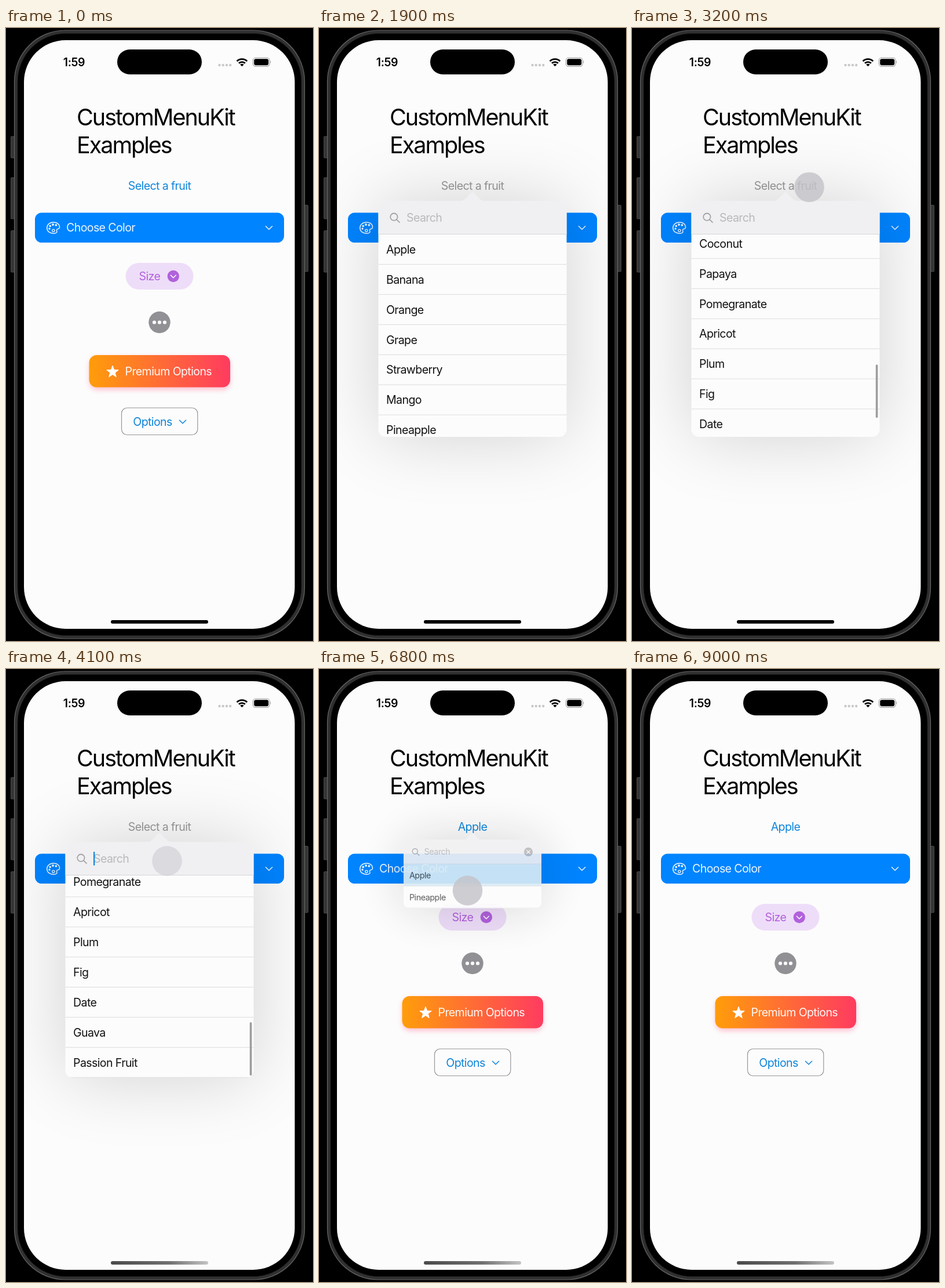
An HTML page that plays this animation: 530 px wide and 1057 px high, repeating every 9.1 s.

```html
<!DOCTYPE html>
<html lang="en">
<head>
<meta charset="utf-8">
<title>Menu examples</title>
<style>
  html, body { margin: 0; width: 100%; height: 100%; overflow: hidden; background: #000; }
  svg { display: block; }
  text {
    font: 400 19.6px Inter, "Liberation Sans", sans-serif;
    font-optical-sizing: none;
    letter-spacing: -.032em;
    white-space: pre;
  }
  .title { font-size: 39.5px; letter-spacing: -.051em; }
  .clock { font-size: 19.5px; font-weight: 600; letter-spacing: -.02em; }
  .mid { text-anchor: middle; }
  .line { fill: none; stroke-linecap: round; stroke-linejoin: round; }
</style>
</head>
<body>
<svg width="530" height="1057" viewBox="0 0 530 1057">
  <defs>
    <linearGradient id="sunset">
      <stop offset="0" stop-color="#ff9d0a"/>
      <stop offset="1" stop-color="#ff3b60"/>
    </linearGradient>
    <linearGradient id="faded">
      <stop offset="0" stop-color="#4a4a4a"/>
      <stop offset=".6" stop-color="#707070"/>
      <stop offset="1" stop-color="#c4c4c4"/>
    </linearGradient>
    <filter id="soft" x="-100%" y="-100%" width="300%" height="300%"><feGaussianBlur stdDeviation="62"/></filter>
    <filter id="glow" x="-20%" y="-50%" width="140%" height="200%"><feGaussianBlur stdDeviation="5"/></filter>
    <clipPath id="screen"><rect x="31" y="21" width="467.5" height="1015" rx="72"/></clipPath>
    <clipPath id="panelClip"><rect class="box" x="102.5" y="298" width="325" height="407" rx="13"/></clipPath>
    <clipPath id="listClip"><rect x="102" y="355.5" width="326" height="350"/></clipPath>
    <path id="chevron" class="line" d="M-5.6-2.8 0 2.8 5.6-2.8"/>
  </defs>

  <g fill="#343434" stroke="#575757" stroke-width=".8">
    <rect x="8.5" y="187" width="8" height="37" rx="1"/>
    <rect x="8.5" y="258" width="8" height="71" rx="1"/>
    <rect x="8.5" y="349.500" width="8" height="71.500" rx="1"/>
    <rect x="513.500" y="305.500" width="8" height="114.500" rx="1"/>
  </g>
  <rect x="14.500" y="4" width="501" height="1049" rx="88" fill="#303030" stroke="#666" stroke-width="1.2"/>
  <rect x="20" y="9.500" width="490" height="1038" rx="83" stroke="#1b1b1b"/>
  <rect x="31" y="21" width="467.5" height="1015" rx="72" fill="#fcfcfc"/>

  <g clip-path="url(#screen)">
    <rect x="192" y="37" width="146" height="43" rx="21.500"/>
    <text class="clock mid" x="117.500" y="66">1:59</text>
    <g fill="#c9c9c9">
      <circle cx="368.500" cy="64" r="2.200"/><circle cx="374.700" cy="64" r="2.200"/>
      <circle cx="381" cy="64" r="2.200"/><circle cx="387.200" cy="64" r="2.200"/>
    </g>
    <g fill="none" stroke="#000" stroke-width="2.900">
      <path d="M398.600 57.200a12.600 12.600 0 0 1 17.600 0"/>
      <path d="M402 60.800a7.800 7.800 0 0 1 10.800 0"/>
    </g>
    <path d="M407.400 66.300l-3.200-3.300a4.600 4.600 0 0 1 6.400 0z"/>
    <rect x="426.300" y="51.300" width="28.800" height="14.800" rx="4.600" fill="none" stroke="#9b9b9b" stroke-width="1.100"/>
    <rect x="428.200" y="53.200" width="25" height="11" rx="3"/>
    <path d="M456.300 56.300q2 2.400 0 4.800z" fill="#9b9b9b"/>

    <text class="title" x="122" y="168">CustomMenuKit</text>
    <text class="title" x="122" y="216">Examples</text>
    <text id="fruit" class="mid" x="265" y="279"></text>

    <rect x="50" y="318.500" width="430" height="51.500" rx="11.500" fill="#0084ff"/>
    <g stroke="#fff" opacity=".93">
      <path class="line" stroke-width="1.500" d="M82 335C75 335 70.500 339.500 70.700 345C71 351 76 354.300 82.500 354.200C86.500 354.100 88.600 352.500 87.700 350.200C86.800 347.600 88.400 346.500 90.300 346.300C92.300 346 92.700 344 92.400 342.300C91.400 337.600 87.500 335 82 335Z"/>
      <circle cx="81.800" cy="349.300" r="2.100" fill="none" stroke-width="1.300"/>
      <g fill="#fff" stroke="none">
        <circle cx="75" cy="346" r="1.700"/><circle cx="76.200" cy="341.400" r="1.800"/>
        <circle cx="81" cy="339" r="1.900"/><circle cx="86.300" cy="339.800" r="1.900"/>
      </g>
      <use href="#chevron" x="454" y="344.500" stroke-width="1.500"/>
    </g>
    <text x="104" y="351" fill="#fff" fill-opacity=".93">Choose Color</text>

    <rect x="206.500" y="405" width="117" height="46" rx="23" fill="#eeddf9"/>
    <text id="size" x="229.500" y="435">Size</text>
    <circle id="sizeDot" cx="288.800" cy="428" r="10.200"/>
    <use href="#chevron" x="0" y="0" transform="translate(288.800 428.500) scale(.8)" stroke="#fff" stroke-width="1.900"/>

    <circle cx="265" cy="507.500" r="18.700" fill="#919195"/>
    <g fill="#fff">
      <circle cx="256" cy="507.500" r="3.100"/><circle cx="265" cy="507.500" r="3.100"/><circle cx="274" cy="507.500" r="3.100"/>
    </g>

    <rect x="144" y="568" width="243" height="56" rx="14" fill="#ff4a78" opacity=".32" filter="url(#glow)"/>
    <rect x="143.500" y="564" width="243.500" height="55.500" rx="13" fill="url(#sunset)"/>
    <path id="star" fill="#fff" stroke="#fff" stroke-width="1" stroke-linejoin="round"/>
    <text x="205.500" y="599" fill="#fff" fill-opacity=".95">Premium Options</text>

    <rect x="199.500" y="655" width="131.300" height="46.500" rx="9.500" fill="none" stroke="#96969a" stroke-width="1.200"/>
    <text id="options" class="mid" x="253" y="685.500">Options</text>
    <use id="optionsArrow" href="#chevron" x="305" y="679" stroke-width="1.500"/>

    <g id="menu">
      <rect class="box" x="102.500" y="298" width="325" height="407" rx="13" opacity=".17" filter="url(#soft)"/>
      <g id="panel">
        <path d="M244 299C254 297 260 283.500 265 283.500S276 297 286 299Z" fill="#f0f0f2"/>
        <g clip-path="url(#panelClip)">
          <rect x="102" y="298" width="326" height="407" fill="#fcfcfc"/>
          <g clip-path="url(#listClip)">
            <g id="rows"></g>
            <rect id="thumb" x="420.800" width="3.600" height="92" rx="1.800" fill="#9d9d9f"/>
          </g>
          <rect x="102" y="298" width="326" height="57.500" fill="#f0f0f2"/>
          <path d="M102 355.500H428" stroke="#d6d6d8"/>
          <g class="line" stroke="#a3a3a7" stroke-width="1.800">
            <circle cx="129.400" cy="325.700" r="6.200"/><path d="M134 330.300 139 335.200"/>
          </g>
          <text id="query" x="151" y="334"></text>
          <rect id="caret" y="315" width="2.200" height="24" rx="1" fill="#0a84e6"/>
          <g id="clear">
            <circle cx="396.800" cy="327.300" r="10.500" fill="#bcbcc0"/>
            <path class="line" d="M393 323.500l7.600 7.600m0-7.600l-7.600 7.600" stroke="#fafafa" stroke-width="1.700"/>
          </g>
        </g>
      </g>
    </g>

    <circle id="touch" r="25.800" fill="#c5c5ca"/>
    <rect id="home" x="181" y="1021" width="168" height="6" rx="3"/>
  </g>
</svg>

<script>
const LOOP = 9100, ROW = 51.9, TOP = 355.7, VIEW = 348.6;
const OPEN = 850, CLOSE = 6600, PICKED = 6700;
const FRUITS = ("Apple,Banana,Orange,Grape,Strawberry,Mango,Pineapple,Watermelon,Kiwi,Peach,Pear,Cherry," +
  "Blueberry,Raspberry,Lemon,Lime,Coconut,Papaya,Pomegranate,Apricot,Plum,Fig,Date,Guava,Passion Fruit").split(",");
const MAX_SCROLL = FRUITS.length * ROW - VIEW;

const TYPING = [[0, ""], [4500, "A"], [4800, "Ap"], [5000, "App"]];
const SCROLL = [[2060, 0], [2450, 417], [2800, 555, "out"], [3200, 840], [3230, 857], [3700, MAX_SCROLL, "out"]];
// Each touch is a list of [time, x, y]; it fades after its last point.
const TOUCHES = [
  [[600, 268, 290], [850, 268, 290]],
  [[2060, 290, 675], [2450, 302, 258]],
  [[2800, 292, 560], [3200, 306, 275], [3230, 307, 258]],
  [[3850, 278, 331], [4030, 278, 331]],
  [[6500, 256.5, 382], [6850, 256.5, 382]]
];

const $ = id => document.getElementById(id);
const clamp = v => Math.min(1, Math.max(0, v));
const ramp = (t, from, to) => clamp((t - from) / (to - from));
const mix = (a, b, p) => a + (b - a) * p;
const out = p => 1 - (1 - p) ** 3;
const show = (el, on) => { el.style.display = on ? "" : "none"; };
const blend = (a, b, p) => `rgb(${a.map((v, i) => Math.round(mix(v, b[i], p)))})`;

function track(keys, t, col = 1) {
  const next = keys.findIndex(k => k[0] > t);
  if (next === 0) return keys[0][col];
  if (next < 0) return keys[keys.length - 1][col];
  const a = keys[next - 1], b = keys[next];
  const p = ramp(t, a[0], b[0]);
  return mix(a[col], b[col], b[3 - col] === "out" ? out(p) : p);
}

function make(parent, tag, attrs, text = "") {
  const el = document.createElementNS("http://www.w3.org/2000/svg", tag);
  for (const k in attrs) el.setAttribute(k, attrs[k]);
  el.textContent = text;
  return parent.appendChild(el);
}

const rows = FRUITS.map(name => {
  const g = make($("rows"), "g", {});
  const back = make(g, "rect", { x: 102, y: 0, width: 326, height: ROW, fill: "#d9ebf5", opacity: 0 });
  make(g, "text", { x: 116, y: 33.2, fill: "#111" }, name);
  make(g, "path", { d: `M102 ${ROW}H428`, stroke: "#dddddf" });
  return { name, g, back };
});

$("star").setAttribute("d", "M" + Array.from({ length: 10 }, (_, i) => {
  const r = i % 2 ? 4.5 : 10.7, a = i * Math.PI / 5 - Math.PI / 2;
  return `${(184 + r * Math.cos(a)).toFixed(2)} ${(593 + r * Math.sin(a)).toFixed(2)}`;
}).join("L") + "Z");

const matches = q => FRUITS.filter(n => n.toLowerCase().includes(q.toLowerCase()));
const panelHeight = q => Math.min(407, 58 + matches(q).length * ROW);

function drawMenu(t) {
  const closing = ramp(t, CLOSE, CLOSE + 450), opening = ramp(t, OPEN, OPEN + 450);
  const visible = opening > 0 && closing < 1;
  show($("menu"), visible);
  if (!visible) return;

  const step = TYPING.findLastIndex(k => k[0] <= t);
  const [since, query] = TYPING[step];
  const before = step ? TYPING[step - 1][1] : "";
  const height = mix(panelHeight(before), panelHeight(query), out(ramp(t, since, since + 100)));
  document.querySelectorAll(".box").forEach(b => b.setAttribute("height", height));

  const scale = mix(.25, 1, out(opening)) - .6 * closing;
  $("menu").setAttribute("transform", `translate(265 283) scale(${scale}) translate(-265 -283)`);
  $("menu").setAttribute("opacity", clamp(opening * 3) * (1 - closing ** 3));
  const ink = 1 - .6 * closing;

  const scroll = query ? 0 : track(SCROLL, t);
  const found = matches(query);
  for (const { name, g, back } of rows) {
    const i = found.indexOf(name);
    show(g, i >= 0);
    g.setAttribute("transform", `translate(0 ${TOP + i * ROW - scroll})`);
    g.lastChild.previousSibling.setAttribute("opacity", ink);
    back.setAttribute("opacity", name === "Apple" ? ramp(t, 6560, 6660) : 0);
  }
  $("thumb").setAttribute("y", 358 + 251 * scroll / MAX_SCROLL);
  $("thumb").setAttribute("opacity", query ? 0 : ramp(t, 2060, 2160) * (1 - ramp(t, 4200, 4450)));

  const typed = t < PICKED ? query : "";
  $("query").textContent = typed || "Search";
  $("query").setAttribute("fill", typed ? "#111" : "#b9b9bd");
  show($("clear"), query);
  const blinkOff = t > 5600 && t < 6100;
  show($("caret"), t >= 4060 && t < PICKED && !blinkOff);
  $("caret").setAttribute("x", 151 + (typed ? $("query").getComputedTextLength() : 0));
}

function drawTouch(t) {
  const path = TOUCHES.find(p => t >= p[0][0] && t < p[p.length - 1][0] + 180);
  show($("touch"), path);
  if (!path) return;
  const start = path[0][0], end = path[path.length - 1][0];
  $("touch").setAttribute("cx", track(path, t, 1));
  $("touch").setAttribute("cy", track(path, t, 2));
  $("touch").setAttribute("opacity", .82 * ramp(t, start - 20, start + 60) * (1 - ramp(t, end, end + 180)));
}

function draw(t) {
  const dim = ramp(t, OPEN, OPEN + 350) * (1 - ramp(t, CLOSE, CLOSE + 180));
  const blue = [14, 133, 218], purple = [177, 97, 220];
  $("fruit").textContent = t < PICKED ? "Select a fruit" : "Apple";
  $("fruit").setAttribute("fill", blend(blue, [152, 152, 152], dim));
  $("options").setAttribute("fill", blend(blue, [164, 164, 164], dim));
  $("optionsArrow").setAttribute("stroke", blend(blue, [164, 164, 164], dim));
  $("size").setAttribute("fill", blend(purple, [152, 152, 152], dim));
  $("sizeDot").setAttribute("fill", blend(purple, [152, 152, 152], dim));
  $("home").setAttribute("fill", t < 4050 ? "#000" : "url(#faded)");
  drawMenu(t);
  drawTouch(t);
}

function frame() {
  draw(performance.now() % LOOP);
  requestAnimationFrame(frame);
}
frame();
</script>
</body>
</html>
```
